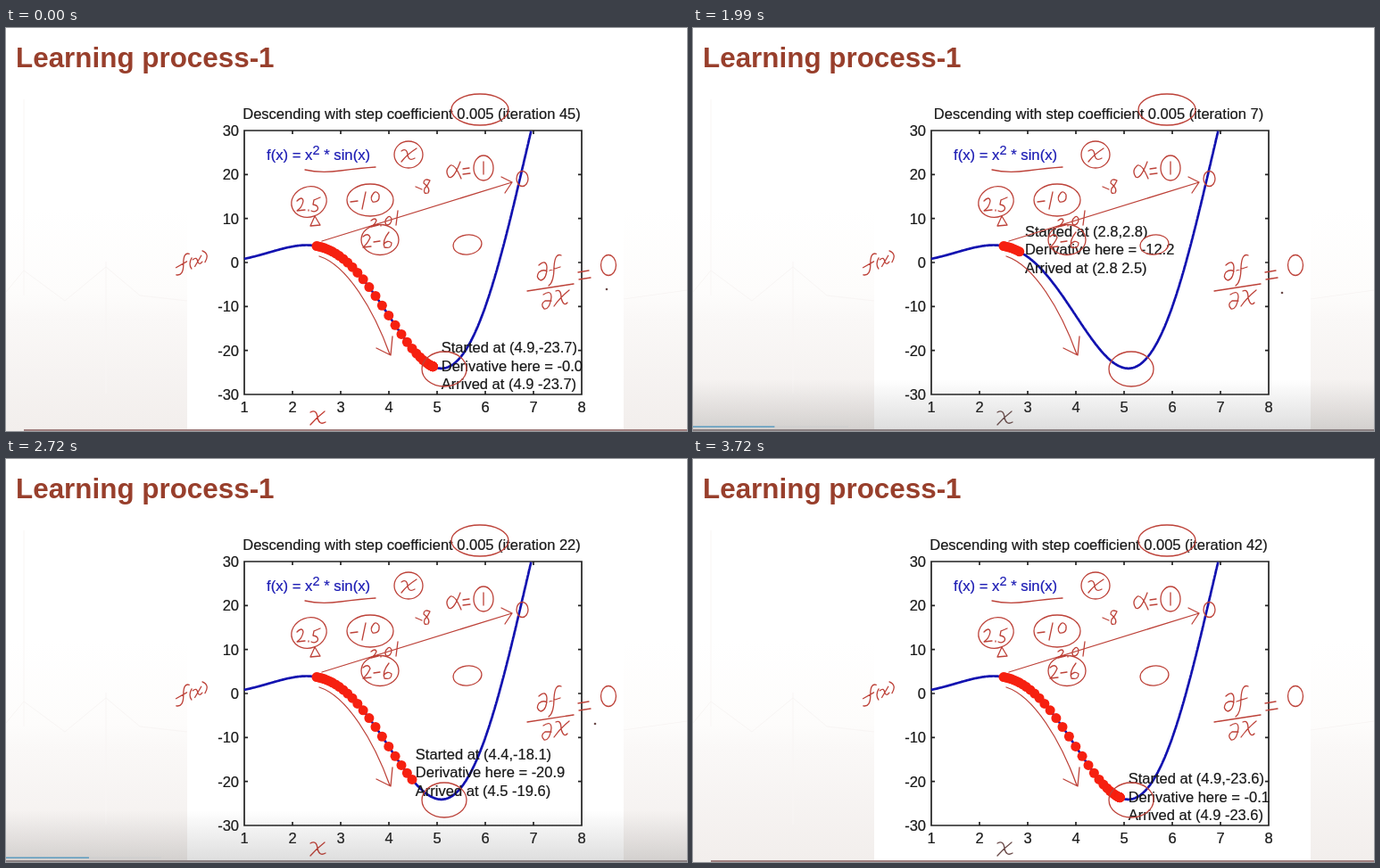
An HTML page for the animation above (3790 ms loop, 763 by 452 pixels).

```html
<!DOCTYPE html>
<html lang="en">
<head>
<meta charset="utf-8">
<title>Learning process-1</title>
<style>
  html, body { margin: 0; width: 100%; height: 100%; overflow: hidden; background: #fff; }
  svg { display: block; width: 763px; height: 452px; font: 16.5px "Liberation Sans", Arial, sans-serif; }
  .ink { fill: none; stroke: #bd4239; stroke-width: 1.3; stroke-linecap: round; stroke-linejoin: round; }
  .label { fill: #181818; stroke: #181818; stroke-width: 0.2; }
  .end { text-anchor: end; }
  .mid { text-anchor: middle; }
</style>
</head>
<body>
<svg viewBox="0 0 763 452">
  <defs>
    <linearGradient id="sky" x1="0" y1="0" x2="0" y2="1">
      <stop offset="0.45" stop-color="#fff"/>
      <stop offset="0.66" stop-color="#fdfcfb"/>
      <stop offset="0.72" stop-color="#faf8f7"/>
      <stop offset="1" stop-color="#f2eeec"/>
    </linearGradient>
    <linearGradient id="shade" x1="0" y1="0" x2="0" y2="1">
      <stop offset="0" stop-color="#555" stop-opacity="0"/>
      <stop offset="1" stop-color="#555" stop-opacity="0.2"/>
    </linearGradient>
  </defs>
  <rect width="763" height="452" fill="url(#sky)"/>
  <path d="M20 80V300M112 262V410M0 296L20 272L66 306L112 268L150 300L203 306M692 304L763 294" fill="none" stroke="#f8f5f4"/>
  <rect x="203" y="80" width="489" height="372" fill="#fff"/>
  <text x="11" y="44" font-size="31.4" font-weight="700" fill="#983f2c">Learning process-1</text>

  <text id="title" class="label mid" x="454.5" y="102"></text>
  <g id="axes" class="label"></g>
  <path id="curve" fill="none" stroke="#1212b0" stroke-width="2.7"/>
  <text x="292" y="147.5" font-size="16.7" fill="#1c1cb4" stroke="#1c1cb4" stroke-width="0.2">f(x) = x<tspan dy="-6" font-size="14.5">2</tspan><tspan dy="6"> * sin(x)</tspan></text>
  <g id="dots" fill="#f62010"></g>
  <g id="info" class="label"><text/><text y="20.4"/><text y="40.8"/></g>

  <g class="ink">
    <!-- circled values -->
    <ellipse cx="531" cy="91.500" rx="32" ry="17.500"/>
    <ellipse cx="451" cy="142" rx="16" ry="15"/>
    <ellipse cx="535" cy="157" rx="11" ry="14"/>
    <ellipse cx="578.5" cy="169" rx="6.5" ry="8.5"/>
    <ellipse cx="339.5" cy="195" rx="20" ry="17" transform="rotate(-20 339.5 195)"/>
    <ellipse cx="408" cy="193" rx="26" ry="18"/>
    <ellipse cx="419" cy="237.5" rx="21" ry="17"/>
    <ellipse cx="517" cy="243" rx="16" ry="11" transform="rotate(-8 517 243)"/>
    <ellipse cx="491" cy="382.5" rx="25" ry="19.5"/>
    <ellipse cx="675" cy="266" rx="8.5" ry="11.5"/>
    <path d="M443 138Q449 134 450 142Q451 150 458 146M460 135Q449 142 443 150"/>
    <path d="M335 159Q352 163 375 160T414 156"/>
    <path d="M509 150Q501 171 496 167Q491 160 498 154Q503 152 510 169M512 158L519 157M512 164L520 163M535 150V164"/>
    <path d="M459 178L466 181M475 171Q468 168 468 174Q476 180 473 185Q467 187 469 180Q473 176 475 171"/>
    <path d="M326 194Q332 188 333 194Q332 201 326 205L335 204M339 204V205M345 193L344 198Q351 199 349 204Q346 207 342 205M345 193L352 190"/>
    <path d="M386 195L394 194M403 184L399 203M412 185Q407 191 411 195Q419 196 418 187Q415 182 412 185"/>
    <path d="M409 216Q414 212 415 216Q413 221 409 223L417 221M420 221V222M428 212Q423 216 426 221Q432 221 432 214Q430 210 428 212M439 205L437 221"/>
    <path d="M400 234Q406 229 408 235Q405 242 400 246L409 245M412 240L419 239M429 229Q421 239 424 246Q432 248 432 241Q427 237 423 243"/>
    <path d="M346 211L341 222L352 221Z"/>
    <!-- arrows -->
    <path d="M354 239L567 173M555 167L567 173L559 185"/>
    <path d="M351 256C382 266 412 316 430 366M415 359L431 367L433 346"/>
    <!-- axis name and derivative -->
    <path transform="rotate(-9 208 264)" d="M207 253Q201 250 199 262Q197 277 189 274M190 266L203 261M209 258Q204 264 207 270M210 260Q215 257 215 263Q216 268 220 264M220 257L211 268M222 252Q230 257 223 265"/>
    <path d="M597 266Q605 259 606 268Q606 282 599 283Q593 280 597 274Q602 270 606 273M622 255Q615 252 614 268Q614 285 608 289M609 272L621 268M584 295L636 287"/>
    <path d="M602 299Q611 293 611 302Q609 316 603 315Q598 310 604 306L611 306M616 295Q622 292 622 303Q625 313 629 308M631 294Q621 302 614 312M641 274L653 272M642 282L655 280"/>
    <path id="xname" d="M341 431Q348 427 349 437Q351 446 358 442M357 430Q348 437 341 445"/>
  </g>
  <circle id="pointer" r="1.3" fill="#6b4a48"/>

  <rect x="20" y="450" width="743" height="2" fill="#a08080"/>
  <g id="bar">
    <rect y="394" width="763" height="58" fill="url(#shade)"/>
    <rect y="446.5" width="174" height="1.5" fill="#cfcfcf"/>
    <rect id="played" y="446.5" height="1.5" fill="#5c9cc0"/>
    <rect y="450" width="763" height="2" fill="#8b8183"/>
  </g>
</svg>
<script>
const LOOP = 3790, TICK = 66, RATE = 0.005, LAST = 45;
const RESET = 25; // tick at which the descent starts again
const $ = id => document.getElementById(id);
const px = x => 267 + (x - 1) * 54;
const py = y => 263 - y * 4.933;
const f = x => x * x * Math.sin(x);
const slope = x => 2 * x * Math.sin(x) + 2 * x * x * Math.cos(x);

function add(parent, tag, attrs, text = '') {
  const el = document.createElementNS('http://www.w3.org/2000/svg', tag);
  for (const key in attrs) el.setAttribute(key, attrs[key]);
  el.textContent = text;
  parent.append(el);
  return el;
}

function drawAxes() {
  const axes = $('axes');
  let d = 'M267 115H645V411H267Z';
  for (let v = 1; v <= 8; v++) {
    d += `M${px(v)} 411v-4M${px(v)} 115v4`;
    add(axes, 'text', { x: px(v), y: 431, class: 'mid' }, v);
  }
  for (let v = -30; v <= 30; v += 10) {
    d += `M267 ${py(v)}h4M645 ${py(v)}h-4`;
    add(axes, 'text', { x: 261, y: py(v) + 6, class: 'end' }, v);
  }
  add(axes, 'path', { d, fill: 'none', stroke: '#222', 'stroke-width': 1.7 });

  const points = [];
  for (let x = 1; f(x) < 30; x += 0.01) points.push(`${px(x).toFixed(1)} ${py(f(x)).toFixed(1)}`);
  $('curve').setAttribute('d', 'M' + points.join('L'));
}

drawAxes();
const steps = [2.5];
for (let i = 0; i < LAST; i++) steps.push(steps[i] - RATE * slope(steps[i]));
const dots = steps.map(x => add($('dots'), 'circle', { cx: px(x), cy: py(f(x)), r: 5.5 }));
const lines = $('info').children;

function showIteration(n) {
  const from = steps[n - 1], to = steps[n];
  $('title').textContent = `Descending with step coefficient 0.005 (iteration ${n})`;
  lines[0].textContent = `Started at (${from.toFixed(1)},${f(from).toFixed(1)})`;
  lines[1].textContent = `Derivative here = ${slope(from).toFixed(1)}`;
  lines[2].textContent = `Arrived at (${to.toFixed(1)} ${f(to).toFixed(1)})`;
  $('info').setAttribute('transform', `translate(${px(from) + 9.5} ${py(f(from)) - 15.3})`);
  $('dots').setAttribute('fill', n === 1 ? '#c8201a' : '#f62010');
  dots.forEach((dot, i) => { dot.style.display = i <= n && (n > 1 || i === 0) ? '' : 'none'; });
}

const clamp = v => Math.max(0, Math.min(1, v));
let shown = -1;

function render(now) {
  const t = now % LOOP;
  const k = Math.min(56, Math.floor(t / TICK));
  if (k !== shown) {
    shown = k;
    showIteration(k < RESET ? LAST : 1 + Math.floor((k - RESET) * 4 / 3 + 1e-6));
    $('bar').style.opacity = Math.min(clamp((k - 2) / 4), clamp((56 - k) / 4));
    $('played').setAttribute('width', 87 + t * 0.0022);
    const red = t < 190 || (t >= 2450 && t < 3520);
    $('xname').style.stroke = red ? '#c23a30' : '#6a4a48';
    $('pointer').setAttribute('transform', t < 1390 ? 'translate(673 293)' : 'translate(660 297)');
    $('pointer').style.opacity = t < 3520 ? 1 : 0;
  }
  requestAnimationFrame(() => render(performance.now()));
}
render(performance.now());
</script>
</body>
</html>
```
